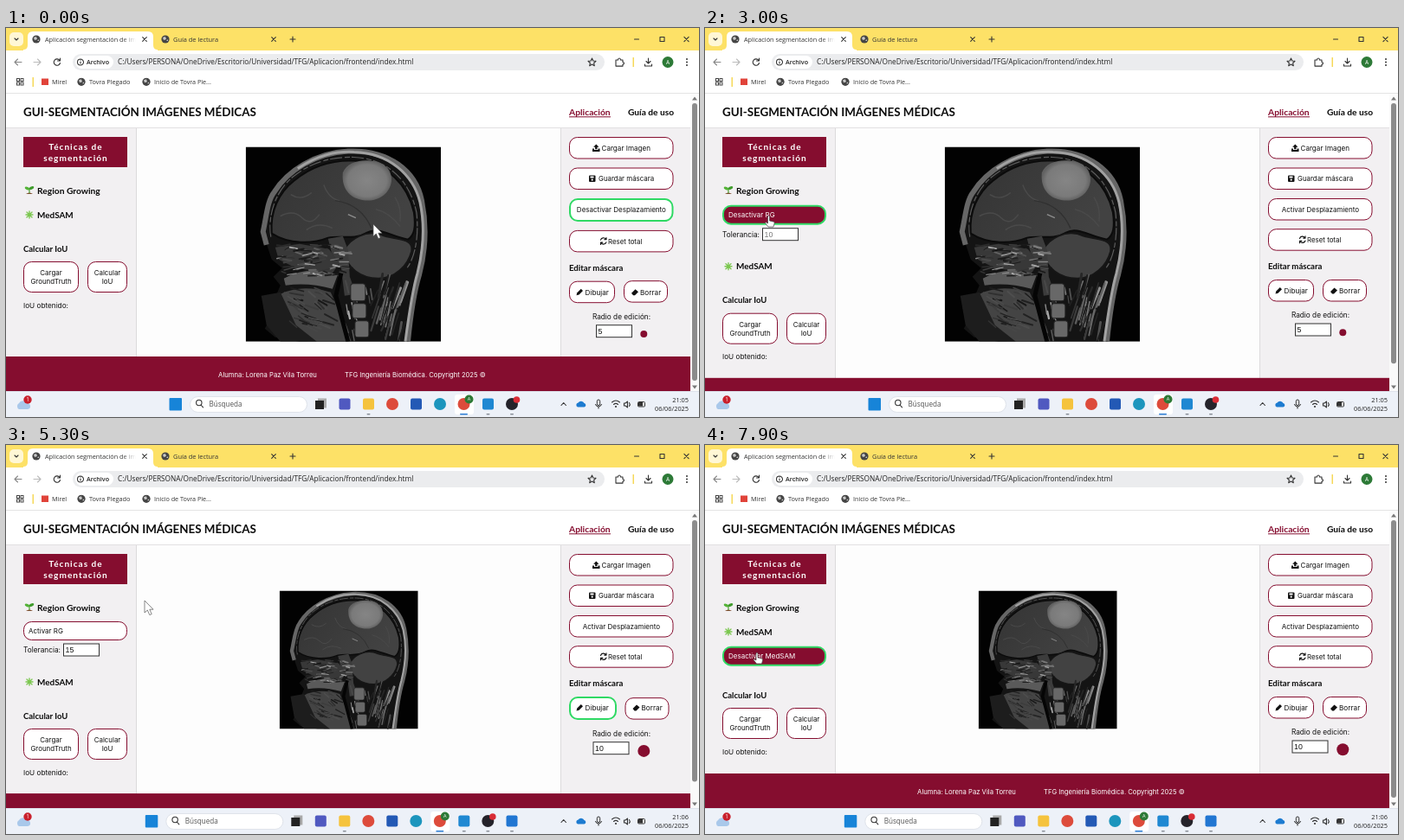
Recreate the animation shown at these times as an HTML page. Size 800 by 450 pixels, loop 8000 ms.

```html
<!DOCTYPE html>
<html lang="es">
<head>
<meta charset="utf-8">
<title>Segmentación</title>
<style>
html, body { margin: 0; width: 100%; height: 100%; overflow: hidden; background: #fff; }
svg { display: block; }
#stage { width: 100%; height: 100%; }
text { white-space: pre; }
.ui { font-family: "Open Sans", "Noto Sans", sans-serif; }
.body { font-family: Inter, sans-serif; }
.head { font-family: Lato, sans-serif; font-weight: 700; }
.field { font-family: "Liberation Sans", sans-serif; }
.line { fill: none; stroke: #333; stroke-width: 1.1; stroke-linecap: round; stroke-linejoin: round; }
</style>
</head>
<body>
<svg id="stage" viewBox="0 0 800 450">
  <defs>
    <linearGradient id="tabFade"><stop offset="0" stop-color="#fff" stop-opacity="0"/><stop offset="1" stop-color="#fff"/></linearGradient>
    <radialGradient id="lesion"><stop offset="0" stop-color="#858585"/><stop offset=".8" stop-color="#7a7a7a"/><stop offset="1" stop-color="#626262"/></radialGradient>
    <linearGradient id="brain" x2="1" y2=".4"><stop offset="0" stop-color="#343434"/><stop offset="1" stop-color="#424242"/></linearGradient>
    <pattern id="speckle" width="3" height="3" patternUnits="userSpaceOnUse"><path d="M0 0h1.2v1.2H0zM1.6 1.6h1v1h-1z" fill="#5b3338"/></pattern>
    <symbol id="scan" viewBox="0 0 225 225">
      <rect width="225" height="225" fill="#020202"/>
      <path d="M24 112 20 97C24 80 25 62 34 51C50 26 82 5 118 4C165 2 196 28 203 62C209 92 207 120 200 150C194 170 190 200 188 225H62L34 220 22 210 30 196 20 186 34 174 40 160 32 150 42 140 30 130Z" fill="#141414"/>
      <path d="M24 113 20 98C24 80 25 62 33 52C48 28 80 7 118 5C165 3 196 28 203 62C209 92 208 118 200 148C194 168 190 195 187 225" fill="none" stroke="#666" stroke-width="6"/>
      <path d="M60 25C84 9 104 5 125 6C165 7 193 32 201 64C207 92 205 118 198 146C192 166 188 195 184 225" fill="none" stroke="#a2a2a2" stroke-width="3"/>
      <path d="M29 104C25 76 36 50 54 35C74 18 100 11 125 12C167 14 190 42 197 76C200 104 195 128 186 140" fill="none" stroke="#5c5c5c" stroke-width="1.2" stroke-dasharray="14 3 6 2"/>
      <path d="M30 100C28 75 38 53 56 39C76 22 100 15 125 16C165 19 187 45 194 76C196 92 195 102 187 107C165 102 152 92 140 99C125 108 110 102 95 105C78 112 50 113 30 100Z" fill="url(#brain)" stroke="#0b0b0b" stroke-width="2"/>
      <g fill="none" stroke="#4a4a4a" stroke-width="1.4">
        <path d="M40 80q15-8 25 2t20-4M52 55q12 8 24-2M70 96q14-10 30-2M90 44q6 16 18 18M172 58q8 12 6 28M150 72q16 4 28 20"/>
        <path d="M103 62q30 4 42 32" stroke="#303030"/>
      </g>
      <path d="M113 121C119 106 140 94 160 103C178 108 194 106 191 121C187 137 172 152 153 152C132 152 117 140 113 121Z" fill="#424242" stroke="#161616" stroke-width="1.8"/>
      <path d="M95 106 112 103 118 119 120 150 127 170 114 172 110 140 99 122Z" fill="#3c3c3c"/>
      <path d="M112 30C116 19 130 15 144 16C160 18 169 26 168 40C166 54 154 62 141 62C122 62 110 50 112 30Z" fill="url(#lesion)"/>
      <path d="m118 78 9 4" stroke="#8d8d8d" stroke-width="1.3"/>
      <path d="M34 116 62 112 96 118 108 134 100 146 58 140 38 130Z" fill="#383838"/>
      <path d="M44 152Q74 136 106 148L100 164Q72 156 46 160Z" fill="#5a5a5a"/>
      <path d="M40 170Q64 158 98 168L112 200 122 225H72L48 200Z" fill="#444"/>
      <path d="M18 172 40 168 58 206 82 225H40L24 206Z" fill="#1d1d1d"/>
      <g id="tissue" fill="none" stroke-linecap="round"></g>
      <path d="M110 146 104 172 118 225" fill="none" stroke="#050505" stroke-width="5"/>
      <g fill="#686868" stroke="#222"><rect x="121" y="158" width="17" height="20" rx="3"/><rect x="123" y="181" width="16" height="17" rx="3"/><rect x="126" y="201" width="16" height="19" rx="3"/></g>
    </symbol>
    <symbol id="globe" viewBox="-5 -5 10 10"><circle r="4.6" fill="#454545"/><path d="M-3-2 0-3 1 0-2 1ZM1 2 3 0 3 2Z" fill="#c9c9c9"/></symbol>
    <path id="arrow" d="M0 0V14L3.3 11 5.8 16.6 8.2 15.6 5.8 10.2H10Z" fill="#fff" stroke="#555" stroke-width=".7"/>
    <path id="hand" d="M-1 1Q0-1 1 1V6L6 7.2Q7 7.5 6.6 9L5.5 13H-.5L-4 8.5Q-4 6.8-1 9Z" fill="#fff" stroke="#444" stroke-width=".7"/>
  </defs>
  <g id="base"></g>
  <g id="live"></g>
  <use id="cursor"/>
</svg>
<script>
const LOOP = 8000, WINE = '#850d2f', GREEN = '#2fd964';
const $ = id => document.getElementById(id);

// y is the optical middle of the line
const text = (s, x, y, size, font = 'body', fill = '#111', extra = '') =>
  `<text class="${font}" x="${x}" y="${y + size * .36}" font-size="${size}" fill="${fill}" ${extra}>${s}</text>`;
const MID = 'text-anchor="middle"', END = 'text-anchor="end"';
const rect = (x, y, w, h, fill, r = 0, extra = '') =>
  `<rect x="${x}" y="${y}" width="${w}" height="${h}" rx="${r}" fill="${fill}" ${extra}/>`;
const dot = (x, y, r, fill) => `<circle cx="${x}" cy="${y}" r="${r}" fill="${fill}"/>`;
const line = (d, extra = '') => `<path class="line" d="${d}" ${extra}/>`;
const globe = (x, y) => `<use href="#globe" x="${x - 5}" y="${y - 5}" width="10" height="10"/>`;
const cross = (x, y, r = 2.3) => line(`M${x - r} ${y - r}l${2 * r} ${2 * r}m0 ${-2 * r}l${-2 * r} ${2 * r}`);

function box(x, y, w, h, { on, hover } = {}) {
  const s = on ? 2 : 1;
  return rect(x + s / 2, y + s / 2, w - s, h - s, hover ? WINE : '#fff', 9,
    `stroke="${on ? GREEN : WINE}" stroke-width="${s}"`);
}
const input = (x, y, value, fill) =>
  rect(x + .5, y + .5, 41, 14, '#fff', 0, 'stroke="#333"') + text(value, x + 2.5, y + 7.3, 8.8, 'field', fill);

function tissue() {
  let seed = 11, out = '';
  const rnd = () => (seed = seed * 16807 % 2147483647) / 2147483647;
  const strand = (x, y, dx, dy, grey, w) =>
    out += `<path d="M${x} ${y}l${dx} ${dy}" stroke="rgb(${grey},${grey},${grey})" stroke-width="${w}"/>`;
  for (let i = 0; i < 75; i++)
    strand(36 + rnd() * 76, 113 + rnd() * 36, 4 + rnd() * 9, rnd() * 6 - 3, 25 + rnd() ** 2 * 150, .8 + rnd() * 1.6);
  for (let i = 0; i < 40; i++)
    strand(40 + rnd() * 58, 160 + rnd() * 50, 6 + rnd() * 12, 2 + rnd() * 7, 20 + rnd() * 60, 1 + rnd() * 1.5);
  for (let i = 0; i < 38; i++) {
    const y = 145 + rnd() * 60;
    strand(154 + rnd() * 36 - (y - 145) * .1, y, -4 - rnd() * 6, 16 + rnd() * 14, 20 + rnd() * 125, 1 + rnd() * 2);
  }
  for (let i = 0; i < 26; i++)
    strand(114 + rnd() * 30, 150 + rnd() * 62, 1 + rnd() * 3, 6 + rnd() * 9, 30 + rnd() * 140, 1 + rnd() * 1.4);
  return out;
}

function browser() {
  return rect(0, 0, 800, 450, '#fff') + rect(0, 0, 800, 26, '#fde167') +
    rect(4, 5, 16, 16, '#fff7d5', 5) + line('M10 12l2 2 2-2') +
    '<path d="M20 25Q25 25 25 20V10Q25 4 31 4H164Q170 4 170 10V20Q170 25 175 25V27H20Z" fill="#fff"/>' +
    globe(35, 13) + text('Aplicación segmentación de im', 45, 13, 7.3, 'ui', '#333') +
    rect(134, 6, 16, 15, 'url(#tabFade)') + cross(160, 13) +
    globe(184, 13) + text('Guía de lectura', 193, 13, 7.4, 'ui', '#333') + cross(309, 13) +
    line('M328 13h6m-3-3v6M725.5 13h5M755 10.5h5v5h-5z') + cross(785.5, 13, 2.6) +
    line('M18 39.5h-8m3.5-3.5-3.5 3.5 3.5 3.5', 'style="stroke:#888"') +
    line('M32 39.5h8m-3.5-3.5 3.5 3.5-3.5 3.5', 'style="stroke:#bbb"') +
    line('M62 37.5a3.7 3.7 0 1 0 .5 3M62.5 35v3h-3') +
    rect(77, 30, 614, 19, '#ebecee', 9.5) + rect(80, 32, 44, 15, '#fff', 7.5) +
    line('M86 39v2M86 37v0M89.5 39.5a3.5 3.5 0 1 1-7 0a3.5 3.5 0 1 1 7 0') +
    text('Archivo', 93, 39.3, 7.2, 'ui', '#222', 'font-weight="600"') +
    text('C:/Users/PERSONA/OneDrive/Escritorio/Universidad/TFG/Aplicacion/frontend/index.html', 129, 39.3, 8.28, 'ui', '#222') +
    line('M676.5 35l1.3 3 3.2.3-2.4 2.2.7 3.2-2.8-1.7-2.8 1.7.7-3.2-2.4-2.2 3.2-.3z', 'stroke-width=".9"') +
    line('M704 37h2.5q0-2 1.5-2t1.5 2h2.5v2.5q1.5 0 1.5 1.3t-1.5 1.3v2h-8z') +
    rect(723.5, 34, 1.5, 11, '#f6d95a') + line('M741.5 35v6m-2.5-2.5 2.5 2.5 2.5-2.5M737.5 42v2h8v-2') +
    dot(764, 39.5, 6.5, '#2d7a37') + text('A', 764, 39.5, 6.5, 'ui', '#fff', MID) +
    [36, 39.5, 43].map(y => dot(786, y, 1, '#333')).join('') +
    [0, 1, 2, 3].map(i => rect(12.5 + i % 2 * 4.5, 58.5 + (i >> 1) * 4.5, 3, 3, 'none', 0, 'stroke="#444"')).join('') +
    rect(30.5, 57, 1.5, 11, '#f6d95a') + rect(41, 58.5, 8, 7.5, '#e0433a') +
    text('Mirel', 53, 62.3, 7.3, 'ui', '#333') + globe(87, 62.3) + text('Tovra Plegado', 96, 62.3, 7.3, 'ui', '#333') +
    globe(162, 62.3) + text('Inicio de Tovra Ple...', 171, 62.3, 7.2, 'ui', '#333');
}

function page() {
  return rect(0, 75, 800, 1, '#e4e4e4') +
    text('GUI-SEGMENTACIÓN IMÁGENES MÉDICAS', 20, 97.5, 13.4, 'head', '#0b0b0b') +
    text('Aplicación', 650, 97.5, 10.3, 'head', WINE) + rect(650, 102.3, 48, 1, WINE) +
    text('Guía de uso', 718, 97.5, 10.2, 'head', '#0b0b0b') +
    rect(0, 115, 790, 306, '#fdfdfd') +
    rect(0, 115, 151, 306, '#f2f0f2') + rect(640, 115, 150, 306, '#f2f0f2') +
    rect(0, 115, 790, 1, '#e2e0e2') + rect(150, 116, 1, 305, '#dcdadc') + rect(640, 116, 1, 305, '#dcdadc') +
    rect(20, 126, 120, 35, WINE) +
    text('Técnicas de', 80.5, 137.5, 10.1, 'head', '#fff', MID + ' letter-spacing="1"') +
    text('segmentación', 80.5, 150, 10.1, 'head', '#fff', MID + ' letter-spacing="1"') +
    rect(790, 76, 10, 345, '#fafafa') + '<path d="M792 83.5h6l-3-4zM792 413.5h6l-3 4z" fill="#777"/>';
}

function leftPanel(s) {
  const hoverShift = s.rgHover ? 3 : 0, onShift = s.rgOn ? 1.7 : 0;
  const medY = s.rgOpen ? 274 + hoverShift + onShift : 216 + hoverShift * .6;
  const iou = medY + 38.7 + (s.medHover ? 2 : 0) + (s.medOpen ? 32.4 : 0) + (s.medOn ? 1.6 : 0);
  const title = (label, y, hover, size) => hover
    ? text(label, 37.5, y + .8, size * 1.12, 'head', WINE) : text(label, 36, y, size, 'head', '#0b0b0b');
  const sprout = '<path d="M23 192q4-3 8 0z" fill="#7b4a2a"/><path d="M27 191v-5" stroke="#4b9c2f" stroke-width="1.2"/>' +
    '<ellipse cx="24.5" cy="185.5" rx="3" ry="1.7" transform="rotate(25 24.5 185.5)" fill="#55b338"/>' +
    '<ellipse cx="29.5" cy="185" rx="3" ry="1.7" transform="rotate(-25 29.5 185)" fill="#3f9b2c"/>';
  const spark = `<path d="M23 ${medY}h8M27 ${medY - 4}v8M24 ${medY - 3}l6 6m0-6l-6 6" stroke="#7cc750" stroke-width="1.4" stroke-linecap="round"/>`;
  const toggle = (name, y, on, hover) => box(20, y, 120, on ? 23 : 22, { on, hover }) +
    text((on ? 'Desactivar ' : 'Activar ') + name, on ? 27 : 26, y + 11.2, 8, 'body', hover ? '#fff' : '#111');

  let out = sprout + title('Region Growing', 188, s.rgHover, 10.25) + spark + title('MedSAM', medY, s.medHover, 9.95);
  if (s.rgOpen) {
    const tol = 237 + hoverShift + onShift;
    out += toggle('RG', 204 + hoverShift + (s.rgOn ? .7 : 0), s.rgOn, s.rgBtn) +
      text('Tolerancia:', 20, tol, 8.3) + input(66, tol - 7.5, s.second ? '15' : '10', s.second ? '#111' : '#777');
  }
  if (s.medOpen) out += toggle('MedSAM', 232.7 + (s.medHover ? 2 : 0), s.medOn, s.medBtn);
  out += text('Calcular IoU', 20, iou + .5, 9.5, 'head', '#0b0b0b') +
    box(20, iou + 15.3, 64, 36) + box(94, iou + 15.3, 46, 36) +
    [['Cargar', 52, 28.3], ['GroundTruth', 52, 38.3], ['Calcular', 117, 28.3], ['IoU', 117, 38.3]]
      .map(([label, x, dy]) => text(label, x, iou + dy, 7.9, 'body', '#111', MID)).join('') +
    text('IoU obtenido:', 20, iou + 66, 8.2);

  const foot = Math.max(380, iou + 90.4);
  return out + rect(0, foot, 790, 60, WINE) +
    text('Alumna: Lorena Paz Vila Torreu', 302, foot + 21, 7.7, 'body', '#fff', MID) +
    text('TFG Ingeniería Biomédica. Copyright 2025 ©', 391, foot + 21, 7.65, 'body', '#fff') +
    rect(792, 87, 6, 321 - (foot - 380) * .8, '#8b8b8b', 3);
}

function rightPanel(s) {
  const d = s.moveOn ? 1.7 : 0, e = d + (s.drawOn ? 1.7 : 0), bx = s.drawOn ? 714.5 : 713;
  const ink = s.resetHover ? '#fff' : '#111';
  const pencil = `<path d="M658.5 ${307.5 + d}l.8-3 4.5-4.5 2.2 2.2-4.5 4.5z" fill="#111"/>`;
  const eraser = `<path d="M${bx + 9} ${305 + d}l4.5-4.5 3.5 3-4 4h-2z" fill="#111"/>`;
  return box(650, 126, 120.5, 25.5) + box(650, 161.5, 120.5, 25.5) +
    box(650, 197, 120.5, s.moveOn ? 27 : 25.5, { on: s.moveOn }) +
    box(650, 232.2 + d, 120.5, 25.5, { hover: s.resetHover }) +
    '<path d="M677 139.5h2v1.5h4.5v-1.5h2v3.5h-8.5zM681.3 134.5l3.2 3.3h-2v2.5h-2.4v-2.5h-2z" fill="#111"/>' +
    text('Cargar Imagen', 687.5, 138.8, 8.1) +
    rect(673, 170.5, 7.5, 7.5, '#111', 1) + rect(674.5, 171.5, 4, 2, '#fff') + dot(676.7, 175.7, 1.1, '#fff') +
    text('Guardar máscara', 684, 174.3, 7.9) +
    text((s.moveOn ? 'Desactivar' : 'Activar') + ' Desplazamiento', 710.4, s.moveOn ? 210.5 : 209.7, 8, 'body', '#111', MID) +
    line(`M686.5 ${243.5 + d}a3.3 3.3 0 0 1 6-.8M693 ${240.8 + d}v2.3h-2.3M693 ${246 + d}a3.3 3.3 0 0 1-6 .8M686.5 ${248.7 + d}v-2.3h2.3`, `style="stroke:${ink}"`) +
    text('Reset total', 695, 245 + d, 7.9, 'body', ink) +
    text('Editar máscara', 650, 275.5 + d, 9.6, 'head', '#0b0b0b') +
    box(650, 291 + d, s.drawOn ? 55 : 53, s.drawOn ? 27 : 25.5, { on: s.drawOn }) + box(bx, 291 + e / 1.5, 51, 25.5) +
    pencil + eraser + text('Dibujar', 668.5, 304 + d, 8.2) + text('Borrar', bx + 19, 304 + d, 8.2) +
    text('Radio de edición:', 710.5, 332.5 + e, 8.25, 'body', '#111', MID) +
    input(s.second ? 677.5 : 681, 341.5 + e, s.second ? '10' : '5', '#111') +
    dot(736.3, 352.2 + e, s.second ? 7 : 4, WINE);
}

function scan(s) {
  const [x, y, size] = s.second ? [315.7, 168.5, 160] : [276.7, 137.5, 225.3];
  const partial = 'M112 40C111 27 124 18 142 18C158 18 169 27 168 40L166 52 160 57 162 46 154 43 148 48 143 42 136 48 129 41 124 45 119 42 118 47 124 55 120 56 113 49Z';
  const whole = 'M110 38C110 24 124 15 142 16C160 18 170 27 169 40C166 56 154 64 141 63C122 63 110 53 110 38Z';
  const shape = s.second ? whole : partial;
  const mask = s.mask ? `<path d="${shape}" fill="#c9151f"/>` +
    (s.second ? '' : '<path d="M114 32C118 22 128 18 142 18C156 18 165 23 167 32L150 27 132 28Z" fill="url(#speckle)"/>') : '';
  return `<use href="#scan" x="${x}" y="${y}" width="${size}" height="${size}"/>` +
    `<svg x="${x}" y="${y}" width="${size}" height="${size}" viewBox="0 0 225 225">${mask}</svg>`;
}

function taskbar(s) {
  const sq = (x, fill) => rect(x - 6.5, 428.5, 13, 13, fill, 2), disc = (x, fill) => dot(x, 435, 7, fill);
  const run = (x, w = 4, fill = '#8a8f98') => rect(x - w / 2, 446, w, 1.5, fill, .7);
  return rect(0, 420, 800, 30, '#edf1f8') + rect(0, 420, 800, .7, '#d9dde6') +
    '<path d="M15 441a4 4 0 0 1 0-7 5 5 0 0 1 9 0 3.5 3.5 0 0 1 1 7z" fill="#a9c8ea"/>' +
    dot(25, 430, 4.7, '#c9202c') + text('1', 25, 430, 6.3, 'ui', '#fff', MID) +
    `<g transform="translate(${s.second ? -27.7 : 0})">` +
    rect(188.5, 428, 14.5, 14.5, '#1784d8', 1) +
    rect(212.5, 426.5, 135, 18, '#fff', 9, 'stroke="#dfe3ea"') +
    line('M226 433.5a3.2 3.2 0 1 1-6.4 0a3.2 3.2 0 1 1 6.4 0M225 436l2.5 2.8') + text('Búsqueda', 234.5, 435.3, 8.1, 'ui', '#555') +
    rect(360, 428.5, 10, 11, '#aaa') + rect(357, 431, 10, 10, '#222') +
    sq(391, '#5059c0') + sq(418.5, '#f5c33d') + run(418.5) + disc(446, '#dd4b3b') + sq(473.5, '#2359b5') + disc(501, '#1c95bd') +
    rect(518, 424, 22, 23, '#fff', 3) + disc(528.5, '#dd4b3b') + run(528.5, 9, '#2b7cd3') +
    dot(534.5, 429.5, 5, '#2d7a37') + text('A', 534.5, 429.5, 5.5, 'ui', '#fff', MID) +
    sq(556.5, '#1f88d2') + run(556.5) + disc(584, '#25232a') + run(584) + dot(589.5, 430, 3.8, '#d92c35') + '</g>' +
    (s.second ? sq(584, '#2176d2') + run(584) : '') +
    line('M641 436.5l2.7-3 2.7 3') + '<path d="M660 438.5a2.6 2.6 0 0 1 .5-5 4 4 0 0 1 7 .5 2.3 2.3 0 0 1 0 4.5z" fill="#1d7bd0"/>' +
    rect(682.3, 430, 3.4, 6.5, 'none', 1.7, 'stroke="#333"') + line('M680.5 435.5q3.5 5 7 0M684 438v2') +
    line('M699.5 433q4.5-4 9 0M701.5 435.5q2.5-2.3 5 0') + dot(704, 438, 1.1, '#333') +
    line('M713.5 434v3h1.7l2.3 2v-7l-2.3 2zM719.5 433.5q1.5 2 0 4') +
    rect(729.5, 432.5, 8, 5.5, '#fff', 1, 'stroke="#333"') + rect(730, 433, 5, 4.5, '#333') +
    text(s.second ? '21:06' : '21:05', 788, 430, 7.35, 'ui', '#222', END) + text('06/06/2025', 788, 440.3, 7.35, 'ui', '#222', END);
}

// time, x, y of the pointer tip
const TRACK = [
  [0, 424, 227], [300, 424, 227], [800, 508, 247], [1100, 508, 247], [1700, 84, 191], [2300, 80, 190],
  [2400, 88, 197], [2700, 72, 217], [3100, 74, 217], [3500, 396, 160], [3700, 409, 172], [4399, 409, 172],
  [4400, 700, 243], [4600, 700, 243], [4800, 560, 215], [4900, 560, 215], [5300, 160, 180], [5800, 66, 222],
  [6000, 57.5, 230], [6300, 64, 189], [6600, 64, 189], [6900, 54, 217], [7500, 54, 217], [7800, 60, 240], [8000, 60, 240]
];
function pointer(t) {
  const i = Math.max(1, TRACK.findIndex(k => k[0] > t));
  const [t0, x0, y0] = TRACK[i - 1], [t1, x1, y1] = TRACK[i], p = (t - t0) / (t1 - t0);
  return [x0 + (x1 - x0) * p, y0 + (y1 - y0) * p];
}

function stateAt(t) {
  const during = (a, b = LOOP) => t >= a && t < b;
  return {
    second: during(4400),
    rgHover: during(1700, 2500) || during(6200, 6700), rgOpen: during(1900, 6400),
    rgBtn: during(2600, 3200), rgOn: during(3000, 4400),
    moveOn: t < 3000, mask: during(4000, 4600),
    resetHover: during(4400, 4700), drawOn: during(4400, 7800),
    medHover: during(6900, 7600), medOpen: during(7400), medBtn: during(7600), medOn: during(7800),
    hand: during(1700, 2400) || during(2600, 3200) || during(4400, 4700) || during(6200, 6700) || during(6900)
  };
}

$('tissue').innerHTML = tissue();
$('base').innerHTML = browser() + page();
const start = performance.now();
let shown = '';

function draw(now) {
  const t = Math.floor(Math.max(0, now - start) % LOOP / 100) * 100;
  const s = stateAt(t), key = JSON.stringify(s), [x, y] = pointer(t);
  if (key !== shown) {
    $('live').innerHTML = scan(s) + rightPanel(s) + leftPanel(s) + taskbar(s);
    $('cursor').setAttribute('href', s.hand ? '#hand' : '#arrow');
    shown = key;
  }
  $('cursor').setAttribute('transform', `translate(${x} ${y})`);
  requestAnimationFrame(draw);
}
draw(start);
</script>
</body>
</html>
```
